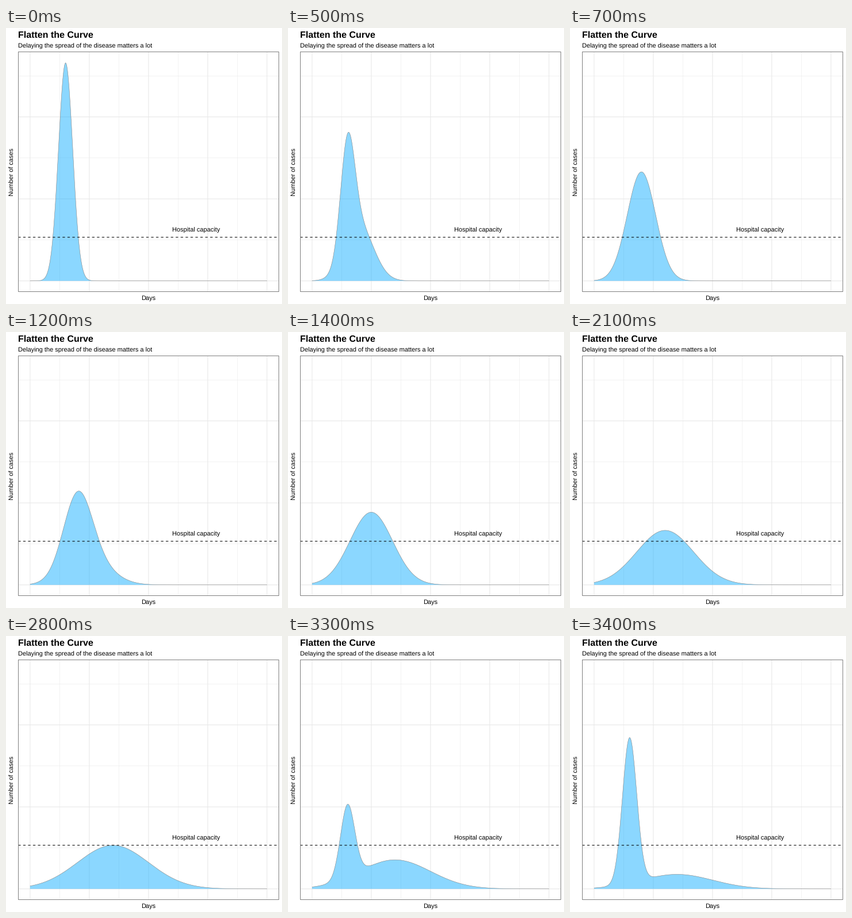
Recreate the animation shown at these times as a matplotlib script. Size 480 by 480 pixels, loop 3.5 s.

```python
import numpy as np
import matplotlib.pyplot as plt
from matplotlib.animation import FuncAnimation

SIZE, DPI = 480, 96
PX = 72 / DPI  # one pixel in points
LEFT, RIGHT, TOP, BOTTOM = 21.24, 474.5, 41.55, 458.75
MEANS = (3, 4, 5, 6, 7)
SDS = (0.6, 1.2, 1.8, 2.4, 3.0)
FRAMES, INTERVAL, CYCLE = 35, 100, 7


def bell(x, mean, sd):
    return np.exp(-((x - mean) / sd) ** 2 / 2) / (sd * np.sqrt(2 * np.pi))


PEAK = bell(3, 3, 0.6)
CAPACITY = bell(7, 7, 3.0)


def to_x(days):
    return LEFT + (RIGHT - LEFT) * (days + 1) / 22


def to_y(cases):
    return BOTTOM - (BOTTOM - TOP) * (cases / PEAK + 0.05) / 1.1


plt.rcParams.update({"font.family": "Liberation Sans", "text.hinting": "none",
                     "path.snap": False})
fig = plt.figure(figsize=(SIZE / DPI, SIZE / DPI), dpi=DPI, facecolor="white")
ax = fig.add_axes([0, 0, 1, 1])
ax.set(xlim=(0, SIZE), ylim=(SIZE, 0))
ax.axis("off")


def line(xs, ys, color, width, z, **style):
    return ax.plot(xs, ys, color=color, lw=width * PX, zorder=z,
                   solid_capstyle="butt", **style)[0]


def label(x, y, text, size=11, **style):
    ax.text(x, y, text, fontsize=size * PX, color="black", zorder=6,
            va="baseline", rotation_mode="anchor", **style)


def grid(x_values, y_values, width, z):
    for v in x_values:
        line([to_x(v)] * 2, [TOP, BOTTOM], "#e8e8e8", width, z)
    for v in y_values:
        line([LEFT, RIGHT], [to_y(v)] * 2, "#e8e8e8", width, z)


grid(np.arange(2.5, 20, 5), np.arange(0.125, 0.65, 0.25), 0.53, 1)
grid(np.arange(0, 21, 5), (0, 0.25, 0.5), 1.07, 2)

days = np.linspace(0, 20, 401)
px = to_x(days)
area = ax.fill(px, px, color="#18b0ff", alpha=0.5, lw=0, zorder=3)[0]
outline = line(px, px, "#7f7f7f", 0.55, 4)

line([LEFT, RIGHT], [to_y(CAPACITY)] * 2, "black", 1.07, 5,
     linestyle=(0, (4, 4)), dash_capstyle="butt")
line([21.5, 474.5, 474.5, 21.5, 21.5], [41.5, 41.5, 458.5, 458.5, 41.5],
     "#808080", 1, 5, solid_joinstyle="miter")

label(21, 17, "Flatten the Curve", 16, weight="bold")
label(21, 35, "Delaying the spread of the disease matters a lot")
label(to_x(14), 355, "Hospital capacity", ha="center")
label(247.4, 473, "Days", ha="center")
label(14, 250, "Number of cases", ha="center", rotation=90)


def cases_at(frame):
    state, step = divmod(frame, CYCLE)
    # the first state is held one frame shorter, so its morph is longer
    hold = 3 if state == 0 else 4
    mix = max(0, step - hold) / (CYCLE - hold)
    after = (state + 1) % len(MEANS)
    return ((1 - mix) * bell(days, MEANS[state], SDS[state])
            + mix * bell(days, MEANS[after], SDS[after]))


def update(frame):
    py = to_y(cases_at(frame))
    base = to_y(0)
    area.set_xy(np.column_stack([np.r_[px, px[-1], px[0]],
                                 np.r_[py, base, base]]))
    outline.set_ydata(py)
    return area, outline


anim = FuncAnimation(fig, update, frames=FRAMES, interval=INTERVAL,
                     repeat=True, repeat_delay=0, blit=False)
plt.show()
```
